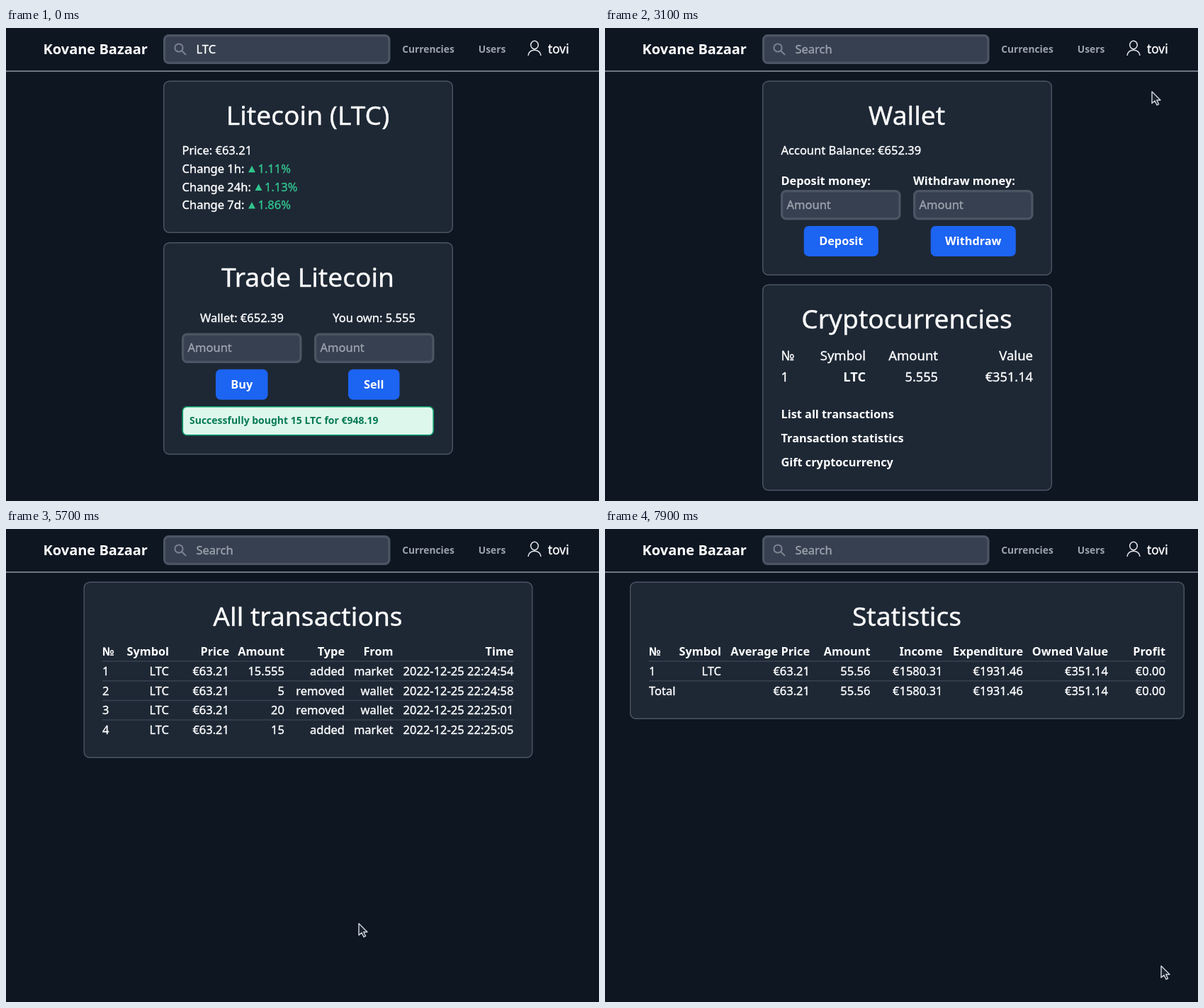
These frames come from a looping animation (837 px wide and 669 px high, 8000 ms). An HTML page with a canvas:

```html
<!DOCTYPE html>
<html lang="en">
<head>
<meta charset="utf-8">
<title>Kovane Bazaar</title>
<style>
  html, body { margin: 0; width: 100%; height: 100%; overflow: hidden; background: #0e1622; }
  canvas { display: block; }
</style>
</head>
<body>
<canvas id="stage" width="837" height="669"></canvas>
<script>
const ctx = document.getElementById('stage').getContext('2d');
const LOOP = 8000, STEP = 100;
const FONT = '"Noto Sans", "Open Sans", sans-serif';
const BODY = 16.5, BOLD = 16.3, HEAD = 37.2;
const C = {
  bg: '#0e1622', card: '#1e2835', edge: '#4b5563', field: '#374050', hover: '#4b5361',
  line: '#374151', white: '#ffffff', muted: '#9ca3af', blue: '#1c64f2', green: '#31c48d'
};

// Scene changes, in ms
const MENU_OPEN = 1700;
const SCENES = [[0, tradePage], [3000, walletPage], [4700, historyPage], [5900, walletPage], [6900, statsPage]];

// Pointer path: time, x, y
const PATH = [
  [200, 842, 330], [600, 815, 190], [1000, 779, 52], [1200, 771, 37], [1900, 771, 37],
  [2300, 776, 114], [2600, 775, 99], [2700, 772, 90], [3100, 772, 90], [3500, 690, 190],
  [3800, 530, 345], [4000, 391, 484], [4300, 346, 544], [5200, 346, 544], [5700, 498, 558],
  [5900, 500, 561], [6400, 380, 581], [7100, 380, 581], [7500, 600, 600], [7900, 785, 618]
];
const ARROW = new Path2D('M0 0V16.5l4-3.5 3 6 2.6-1.3-2.8-5.7H12z');
const HAND = new Path2D('M-2 2q0-2 2-2t2 2v6q2-1 3 .5q2-1 3 .8q3-.6 3 2v3q0 1-1 2v2h-9v-2l-6-5.5q-1-2 1-2.5l2 1.5z');

function pointerAt(t) {
  if (t < PATH[0][0]) return { x: 900, y: 330 };
  const i = PATH.findIndex(p => p[0] > t);
  if (i < 0) { const [, x, y] = PATH[PATH.length - 1]; return { x, y }; }
  const [t0, x0, y0] = PATH[i - 1], [t1, x1, y1] = PATH[i];
  const k = (t - t0) / (t1 - t0);
  return { x: x0 + (x1 - x0) * k, y: y0 + (y1 - y0) * k };
}

function text(str, x, y, { size = BODY, weight = 400, align = 'left', color = C.white } = {}) {
  ctx.font = `${weight} ${size}px ${FONT}`;
  ctx.textAlign = align;
  ctx.fillStyle = color;
  ctx.fillText(str, x, y);
  if (weight === 400) {
    // A hairline gives the regular face a little more body
    ctx.strokeStyle = color;
    ctx.lineWidth = 0.35;
    ctx.lineJoin = 'round';
    ctx.strokeText(str, x, y);
  }
  return ctx.measureText(str).width;
}

// Rounded box given by its outer edges
function box(x0, y0, x1, y1, r, fill, stroke, width = 1) {
  const h = stroke ? width / 2 : 0;
  ctx.beginPath();
  ctx.roundRect(x0 + h, y0 + h, x1 - x0 - 2 * h, y1 - y0 - 2 * h, r);
  if (fill) { ctx.fillStyle = fill; ctx.fill(); }
  if (stroke) { ctx.strokeStyle = stroke; ctx.lineWidth = width; ctx.stroke(); }
}

function segment(x0, y0, x1, y1, color, width) {
  ctx.beginPath();
  ctx.moveTo(x0, y0);
  ctx.lineTo(x1, y1);
  ctx.strokeStyle = color;
  ctx.lineWidth = width;
  ctx.stroke();
}

function card(x0, y0, x1, y1, title) {
  box(x0, y0, x1, y1, 8, C.card, C.edge, 1.4);
  text(title, 426, y0 + 62.5, { size: HEAD, align: 'center' });
}

const field = (x0, y0, x1, y1) => box(x0, y0, x1, y1, 6, C.field, C.edge, 3.2);

function amountField(x, y) {
  field(x, y, x + 169.5, y + 42.5);
  text('Amount', x + 8.5, y + 26.5, { color: C.muted });
}

function button(label, x0, x1, y) {
  box(x0, y, x1, y + 43, 7, C.blue);
  text(label, (x0 + x1) / 2, y + 27, { size: BOLD, weight: 700, align: 'center' });
}

function header(query, menuOpen) {
  segment(0, 61, 837, 61, '#6f7683', 2);
  text('Kovane Bazaar', 52.5, 37, { size: 20, weight: 700 });
  field(222, 9, 542.5, 51);
  ctx.beginPath();
  ctx.arc(244, 28, 5.6, 0, 7);
  ctx.moveTo(248.2, 32.2);
  ctx.lineTo(254, 38);
  ctx.strokeStyle = '#7b8290';
  ctx.lineWidth = 2;
  ctx.stroke();
  text(query || 'Search', 268.5, 36, { color: query ? C.white : C.muted });
  const nav = { size: 13.8, weight: 600, align: 'center', color: C.muted };
  text('Currencies', 596, 34.5, nav);
  text('Users', 686, 34.5, nav);
  if (menuOpen) box(727, 8, 804.5, 50, 8, null, '#23488f', 3.2);
  ctx.beginPath();
  ctx.ellipse(746, 24, 5.3, 5.8, 0, 0, 7);
  ctx.moveTo(737, 39);
  ctx.bezierCurveTo(737.5, 28.5, 754.5, 28.5, 755, 39);
  ctx.strokeStyle = '#e5e7eb';
  ctx.lineWidth = 1.5;
  ctx.stroke();
  text('tovi', 765, 36, { size: 17.3 });
}

function menu(mouse) {
  const item = Math.floor((mouse.y - 59) / 39);
  box(701.5, 57.5, 830, 224.5, 4, C.field, '#6b7280', 1.3);
  if (item >= 0 && item < 4) {
    ctx.fillStyle = C.hover;
    ctx.fillRect(703, 62 + item * 39, 126, 39);
  }
  ['Wallet', 'Account', 'Dark Mode', 'Logout'].forEach((label, i) =>
    text(label, i === 2 ? 736.5 : 720.5, 87 + i * 39, { size: 14.2, color: '#e5e7eb' }));
  ctx.beginPath();
  ctx.arc(723, 160.5, 4.4, 0, 7);
  ctx.fillStyle = C.white;
  ctx.fill();
  for (let i = 0; i < 8; i++) {
    const cos = Math.cos(i * Math.PI / 4), sin = Math.sin(i * Math.PI / 4);
    segment(723 + 6 * cos, 160.5 + 6 * sin, 723 + 8.2 * cos, 160.5 + 8.2 * sin, C.white, 1.7);
  }
}

function change(label, value, x, y) {
  text(label, 248.5, y);
  ctx.beginPath();
  ctx.moveTo(x, y - 0.5);
  ctx.lineTo(x + 5, y - 10);
  ctx.lineTo(x + 10, y - 0.5);
  ctx.fillStyle = C.green;
  ctx.fill();
  text(value, x + 13.5, y, { color: C.green });
}

function tradePage() {
  card(222, 74.5, 631, 290, 'Litecoin (LTC)');
  text('Price: €63.21', 248.5, 179);
  change('Change 1h:', '1.11%', 342, 204.7);
  change('Change 24h:', '1.13%', 351.5, 230.5);
  change('Change 7d:', '1.86%', 342, 256);
  card(222, 303, 631, 603.5, 'Trade Litecoin');
  text('Wallet: €652.39', 333, 416, { align: 'center' });
  text('You own: 5.555', 519.5, 416, { align: 'center' });
  amountField(248, 431.5);
  amountField(435, 431.5);
  button('Buy', 296, 369.5, 482.7);
  button('Sell', 483, 555.5, 482.7);
  box(248.5, 535, 604, 576.5, 6, '#def7ec', '#0e9f6e', 1.6);
  text('Successfully bought 15 LTC for €948.19', 259, 560.3, { size: 14, weight: 600, color: '#057a55' });
}

function walletPage(mouse) {
  card(222, 74.5, 631, 350, 'Wallet');
  text('Account Balance: €652.39', 248.5, 179);
  const strong = { size: BOLD, weight: 700 };
  text('Deposit money:', 248.5, 222, strong);
  text('Withdraw money:', 435, 222, strong);
  amountField(248, 229);
  amountField(435, 229);
  button('Deposit', 280.7, 385.8, 280);
  button('Withdraw', 459.7, 579.8, 280);

  card(222, 362.5, 631, 654.5, 'Cryptocurrencies');
  const cols = [[248.5, '№', '1'], [368, 'Symbol', 'LTC'], [470, 'Amount', '5.555'], [604, 'Value', '€351.14']];
  cols.forEach(([x, name, value], i) => {
    const align = i ? 'right' : 'left';
    text(name, x, 470, { size: 18.5, align });
    text(value, x, 500, { size: 18.2, align, weight: i === 1 ? 700 : 400 });
  });

  let over = false;
  ['List all transactions', 'Transaction statistics', 'Gift cryptocurrency'].forEach((label, i) => {
    const y = 552 + i * 34, w = text(label, 248.5, y, strong);
    if (mouse.x > 248 && mouse.x < 248 + w && mouse.y > y - 18 && mouse.y < y + 6) {
      segment(248.5, y + 2, 248.5 + w, y + 2, C.white, 1.4);
      over = true;
    }
  });
  return over;
}

// First column is left aligned, the others end at their x
function table(xs, names, rows) {
  const row = (cells, y, style) => cells.forEach((cell, i) =>
    text(cell, xs[i], y, { ...style, align: i ? 'right' : 'left' }));
  row(names, 179, { size: BOLD, weight: 700 });
  rows.forEach((cells, i) => {
    const y = 187 + i * 27.7;
    segment(xs[0], y, xs[xs.length - 1], y, C.line, 1.5);
    row(cells, y + 20);
  });
}

function historyPage() {
  card(109.5, 74.5, 743.5, 324, 'All transactions');
  const trades = [['15.555', 'added', 'market', '24:54'], ['5', 'removed', 'wallet', '24:58'],
    ['20', 'removed', 'wallet', '25:01'], ['15', 'added', 'market', '25:05']];
  table([136, 230, 315, 393, 478, 546.5, 716.5],
    ['№', 'Symbol', 'Price', 'Amount', 'Type', 'From', 'Time'],
    trades.map(([amount, type, from, time], i) =>
      [i + 1, 'LTC', '€63.21', amount, type, from, '2022-12-25 22:' + time]));
}

function statsPage() {
  card(35, 74.5, 818, 269, 'Statistics');
  const sums = ['€63.21', '55.56', '€1580.31', '€1931.46', '€351.14', '€0.00'];
  table([62, 164, 289, 374.5, 476.5, 590, 710, 791],
    ['№', 'Symbol', 'Average Price', 'Amount', 'Income', 'Expenditure', 'Owned Value', 'Profit'],
    [['1', 'LTC', ...sums], ['Total', '', ...sums]]);
}

function drawPointer({ x, y }, hand) {
  const shape = hand ? HAND : ARROW;
  ctx.save();
  ctx.translate(x, y);
  ctx.fillStyle = '#1b2330';
  ctx.fill(shape);
  ctx.strokeStyle = '#d5d9df';
  ctx.lineWidth = 1.4;
  ctx.lineJoin = 'round';
  ctx.stroke(shape);
  ctx.restore();
}

function draw(t) {
  const mouse = pointerAt(t);
  const page = SCENES.filter(s => s[0] <= t).pop()[1];
  const menuOpen = page === tradePage && t >= MENU_OPEN;
  ctx.fillStyle = C.bg;
  ctx.fillRect(0, 0, 837, 669);
  header(page === tradePage ? 'LTC' : '', menuOpen);
  const overLink = page(mouse);
  if (menuOpen) menu(mouse);
  const overUser = mouse.x > 728 && mouse.x < 804 && mouse.y < 50;
  drawPointer(mouse, overLink || overUser || menuOpen);
}

const start = performance.now();
function tick() {
  const t = (performance.now() - start) % LOOP;
  draw(Math.floor(t / STEP) * STEP);
  requestAnimationFrame(tick);
}
tick();
</script>
</body>
</html>
```
